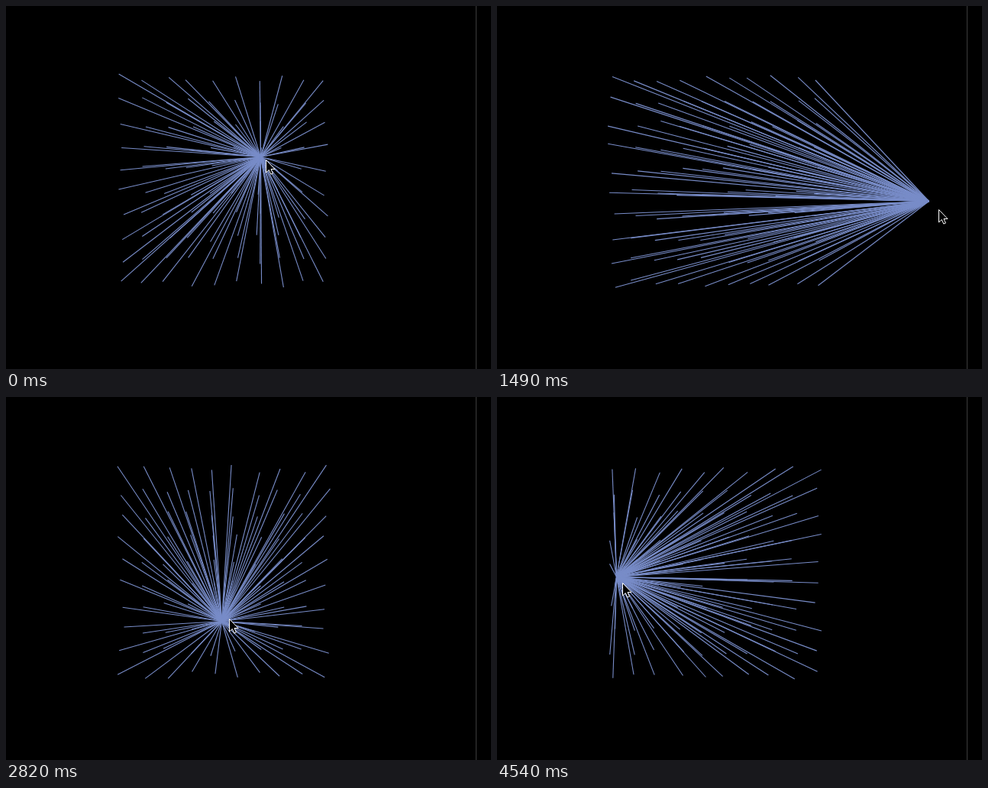
These frames come from a looping animation (635x475 px, 4640 ms). An HTML page with a canvas:

```html
<!DOCTYPE html>
<html lang="en">
<head>
<meta charset="utf-8">
<title>Lines to the pointer</title>
<style>
  html, body { margin: 0; width: 100%; height: 100%; overflow: hidden; background: #000; }
  canvas { display: block; }
</style>
</head>
<body>
<canvas id="stage" width="635" height="475"></canvas>
<script>
const ctx = document.getElementById('stage').getContext('2d');
const LOOP = 4640, STEP = 54, LAG = 50;
const arrow = new Path2D('M0 0V16.5L3.8 13L6.3 18.6L8.9 17.5L6.5 12H11.5Z');

// Hub of the lines: time, place, and how far it moves in one LAG
const keys = [
  { t: 0, pos: [333, 197], move: [7, 4] },
  { t: 1090, pos: [426, 257], move: [14, -6] },
  { t: 1640, pos: [579, 318], move: [-6, 28] },
  { t: 1840, pos: [546, 389], move: [-42, 16] },
  { t: 2300, pos: [281, 360], move: [-14, -11] },
  { t: 3290, pos: [397, 286], move: [9, 1] },
  { t: 4020, pos: [398, 48], move: [-36, -8] },
  { t: 4540, pos: [156, 235], move: [8, 8] }
];

// Hermite curve between two keys; the pointer runs one LAG ahead of the hub
function pose(a, b, u) {
  const span = b.t - a.t, v = 1 - u, hub = [], pointer = [];
  for (const k of [0, 1]) {
    const p = a.pos[k], q = b.pos[k];
    const m = a.move[k] * span / LAG, n = b.move[k] * span / LAG;
    const at = p * (1 + 2 * u) * v * v + q * (3 - 2 * u) * u * u + m * u * v * v - n * u * u * v;
    const speed = 6 * (q - p) * u * v + m * v * (1 - 3 * u) + n * u * (3 * u - 2);
    hub.push(Math.round(at));
    pointer.push(Math.round(at + speed * LAG / span));
  }
  return { hub, pointer };
}

// Mulberry32
function randomizer(seed) {
  return () => {
    seed = seed + 0x6d2b79f5 | 0;
    let x = Math.imul(seed ^ seed >>> 15, 1 | seed);
    x = x + Math.imul(x ^ x >>> 7, 61 | x) ^ x;
    return ((x ^ x >>> 14) >>> 0) / 4294967296;
  };
}

function draw(time) {
  const t = time > 2150 && time < 2300 ? 2150 : Math.min(time, 4540);
  const i = Math.max(1, keys.findIndex(key => key.t > t));
  const last = t >= 4540;
  const b = last ? keys[keys.length - 1] : keys[i];
  const a = last ? keys[keys.length - 2] : keys[i - 1];
  const steps = Math.round((b.t - a.t) / STEP);
  const u = Math.floor((t - a.t) / (b.t - a.t) * steps) / steps;
  const { hub, pointer } = pose(a, b, u);
  const random = randomizer(Math.round(a.t + u * (b.t - a.t)));

  ctx.fillStyle = '#000';
  ctx.fillRect(0, 0, 635, 475);
  ctx.fillStyle = '#3c3c3c';
  ctx.fillRect(615, 0, 1, 475);

  // Grid of jittered points, each joined to the hub
  ctx.lineWidth = 1.1;
  ctx.strokeStyle = '#788cc8';
  for (let x = 145; x < 445; x += 30) {
    for (let y = 89; y < 389; y += 30) {
      ctx.beginPath();
      ctx.moveTo(x + random() * 10, y + random() * 10);
      ctx.lineTo(hub[0] + 0.5, hub[1] + 0.5);
      ctx.stroke();
    }
  }

  ctx.save();
  ctx.translate(pointer[0] + 0.5, pointer[1] + 0.5);
  ctx.lineWidth = 1;
  ctx.fillStyle = '#000';
  ctx.strokeStyle = '#fff';
  ctx.fill(arrow);
  ctx.stroke(arrow);
  ctx.restore();
}

const start = performance.now();
function tick() {
  draw((performance.now() - start) % LOOP);
  requestAnimationFrame(tick);
}
tick();
</script>
</body>
</html>
```
